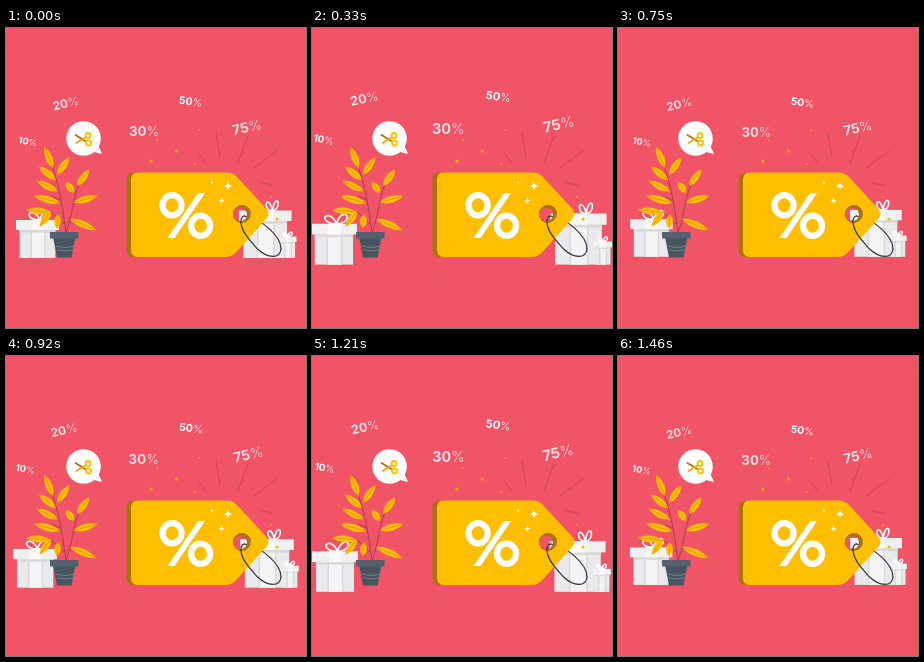
An HTML page for the animation above (1500 ms loop, 300 px wide and 300 px high).

```html
<!DOCTYPE html>
<html lang="en">
<head>
<meta charset="utf-8">
<title>Discount tag</title>
<style>
  html, body { margin: 0; width: 100%; height: 100%; overflow: hidden; background: #f15367; }
  svg { display: block; width: 100vw; height: 100vh; }
  text { font-family: Inter, Roboto, sans-serif; font-weight: 700; text-anchor: middle; }
  .thin { font-weight: 300; }
  .line { fill: none; stroke-linecap: round; stroke-linejoin: round; }
  .string { stroke: #35353b; stroke-width: 1.2; }
</style>
</head>
<body>
<svg viewBox="0 0 300 300">
  <defs>
    <path id="bow" class="line" stroke="#fff" stroke-width="1.600" vector-effect="non-scaling-stroke" d="M0 0C-4 -9 -11 -9 -11 -5C-10 -1 -5 0 0 0C2 -8 8 -11 10 -7C10 -2 5 0 0 0"/>
    <path id="spark" fill="#fff" d="M0 -1Q.1 -.1 1 0Q.1 .1 0 1Q-.1 .1 -1 0Q-.1 -.1 0 -1Z"/>
  </defs>
  <rect width="300" height="300" fill="#f15367"/>
  <path class="line" stroke="#b93f58" stroke-width=".7" d="M193 126L200 136M210 105L214 129M242 108L232 135M271 123L248 140M253 154L267 158"/>
  <g id="floating"></g>

  <!-- speech bubble with scissors -->
  <path fill="#fff" d="M88 124L96 126L92 117Z"/>
  <circle cx="77.500" cy="110.500" r="17.300" fill="#fff"/>
  <g class="line" stroke-width="1.800">
    <path stroke="#a87508" d="M69.500 107L80 113.500"/>
    <path stroke="#f2a900" d="M70.500 115L79.500 109.500"/>
    <circle stroke="#ffbf00" cx="82" cy="107.500" r="2.500"/>
    <circle stroke="#ffbf00" cx="82.500" cy="115" r="2.500"/>
  </g>

  <!-- plant -->
  <path class="line" stroke="#a33a4c" stroke-width=".9" d="M60 205C57 185 55 160 43 130M60 205C67 185 66 174 73 156M54 172L46 168M58 196L45 184"/>
  <g id="leaves"></g>
  <path fill="#46545f" d="M47 209H69.500L65.500 229.500H51Z"/>
  <path fill="#52616d" d="M44 204H72.500V210.500H44Z"/>
  <path class="line" stroke="#93a0aa" stroke-width=".6" d="M50 218Q59 221 68 218M51 222Q59 224 67 222"/>

  <!-- tag -->
  <path class="line string" d="M238 188C255 190 275 208 275 221"/>
  <path fill="#a87508" d="M127.500 144.500H134V229H127.500Q120.500 229 120.500 222V151.500Q120.500 144.500 127.500 144.500Z"/>
  <path fill="#ffbf00" fill-rule="evenodd" d="M132 144.500H220Q226.500 144.500 230.500 148.500L260.500 181Q264.500 186 260.500 190.500L229.500 225Q225.500 229 219 229H132Q125 229 125 222V151.500Q125 144.500 132 144.500ZM227 186a9 9 0 1 0 18 0a9 9 0 1 0 -18 0Z"/>
  <path fill="#a87508" fill-rule="evenodd" d="M227 186a9 9 0 1 0 18 0a9 9 0 1 0 -18 0ZM227.600 186.500a6.700 6.700 0 1 0 13.400 0a6.700 6.700 0 1 0 -13.400 0Z"/>
  <path class="line string" d="M275 221C274 231 262 231 251 220.500C243 211.500 234 202 235 192Q236 188 239 188"/>

  <g fill="none" stroke="#fff" stroke-width="6.300">
    <ellipse cx="166" cy="177.300" rx="9.500" ry="10.100"/>
    <ellipse cx="194.500" cy="197.700" rx="9.500" ry="10.100"/>
  </g>
  <path fill="#fff" d="M192 165H199L168.500 210H161.500Z"/>

  <use href="#spark" transform="translate(222 158) scale(4.500)"/>
  <use href="#spark" transform="translate(215.500 172.500) scale(3)"/>
  <circle cx="206" cy="154.500" r="1.100" fill="#fff"/>
  <g class="line" stroke="#ffb000">
    <path stroke-width="3" d="M145 133h0M170.500 123h0M271 191h0"/>
    <path stroke-width="1.700" d="M151 112h0M189 136h0M193.500 102h0M265 169h0"/>
  </g>
</svg>

<script>
  const byId = id => document.getElementById(id);
  const lerp = (a, b, u) => a + (b - a) * u;

  const label = (digits, x, y, size, angle, colour = '#fff') =>
    `<text transform="translate(${x} ${y}) rotate(${angle})" y="${size * 0.36}" font-size="${size}" fill="${colour}">${digits}<tspan class="thin">%</tspan></text>`;

  // A lidded box standing on the floor, with a ribbon at 37% of its width
  function present(x, top, width, lid, bowX, bowWidth, bowHeight) {
    const floor = 230, ribbon = x + width * 0.37, band = width * 0.28;
    const rect = (left, y, w, bottom, fill) =>
      `<rect x="${left}" y="${y}" width="${w}" height="${bottom - y}" fill="${fill}"/>`;
    const bodyX = x + width * 0.085, bodyWidth = width * 0.83, under = top + lid;
    return rect(bodyX, under, bodyWidth, floor, '#eaeaec') +
      rect(ribbon - 1.5, under, band + 3, floor, '#dadadd') +
      rect(ribbon, under, band, floor, '#f4f4f5') +
      rect(bodyX, under, bodyWidth, under + lid / 4, '#d9d9dc') +
      rect(x, top, width, under, '#f0f0f1') +
      rect(ribbon, top, band, under, '#fafafa') +
      `<use href="#bow" transform="translate(${bowX} ${top}) scale(${bowWidth} ${bowHeight})"/>`;
  }

  // Angles are in degrees, clockwise from straight up
  function leaf(x, y, angle, length) {
    const middle = -length * 0.45, width = 7;
    return `<g transform="translate(${x} ${y}) rotate(${angle})">
      <path fill="#ffbf00" d="M0 0Q${width} ${middle} 0 ${-length}Q${-width} ${middle} 0 0"/>
      <path class="line" stroke="#c98500" stroke-width=".6" d="M0 0V${-length}"/></g>`;
  }

  // Leaves spread evenly from one leaf to another
  const fan = (count, first, last) => Array.from({ length: count }, (_, i) =>
    leaf(...first.map((value, k) => lerp(value, last[k], i / (count - 1))))).join('');

  const pale = '#f3dcdf';
  byId('floating').innerHTML =
    label(10, 21.8, 113.5, 9.2, 10) +
    label(20, 59.7, 75.3, 11.8, -13, pale) +
    label(30, 138, 103.5, 13.4, 0, pale) +
    label(50, 184.7, 73.5, 10.5, 8) +
    label(75, 240.8, 99.2, 13.8, -13, pale) +
    present(10, 192, 43, 10, 34, 1, 1) +
    present(233, 182.5, 52.5, 10.5, 266.5, 0.58, 1.1) +
    present(273.5, 208.5, 17, 5.5, 282, 0.42, 0.5);

  byId('leaves').innerHTML =
    leaf(47, 140, -22, 23) + leaf(51, 147, 35, 22) +
    fan(3, [50, 152, -51, 22], [54, 175, -75, 27]) +
    fan(3, [71, 158, 37, 21], [64, 191, 113, 29]) +
    fan(2, [44, 184, -85, 24], [45, 183, -144, 19]) +
    leaf(68, 165, -36, 14) + leaf(51, 200, 4, 14);

  const LOOP = 1500, FRAMES = 36, STEP = LOOP / FRAMES;
  const NEAR = 1.076, FAR = 0.985;
  const keys = [[0, 1], [375, NEAR], [770, FAR], [1125, NEAR], [LOOP, FAR]];

  function scaleAt(time) {
    const i = keys.findIndex(key => key[0] > time);
    const [t0, s0] = keys[i - 1], [t1, s1] = keys[i];
    return lerp(s0, s1, (1 - Math.cos(Math.PI * (time - t0) / (t1 - t0))) / 2);
  }

  function draw() {
    const frame = Math.floor((performance.now() % LOOP + 5) / STEP) % FRAMES;
    byId('floating').setAttribute('transform',
      `translate(162 141) scale(${scaleAt(frame * STEP)}) translate(-162 -141)`);
    requestAnimationFrame(draw);
  }
  draw();
</script>
</body>
</html>
```
